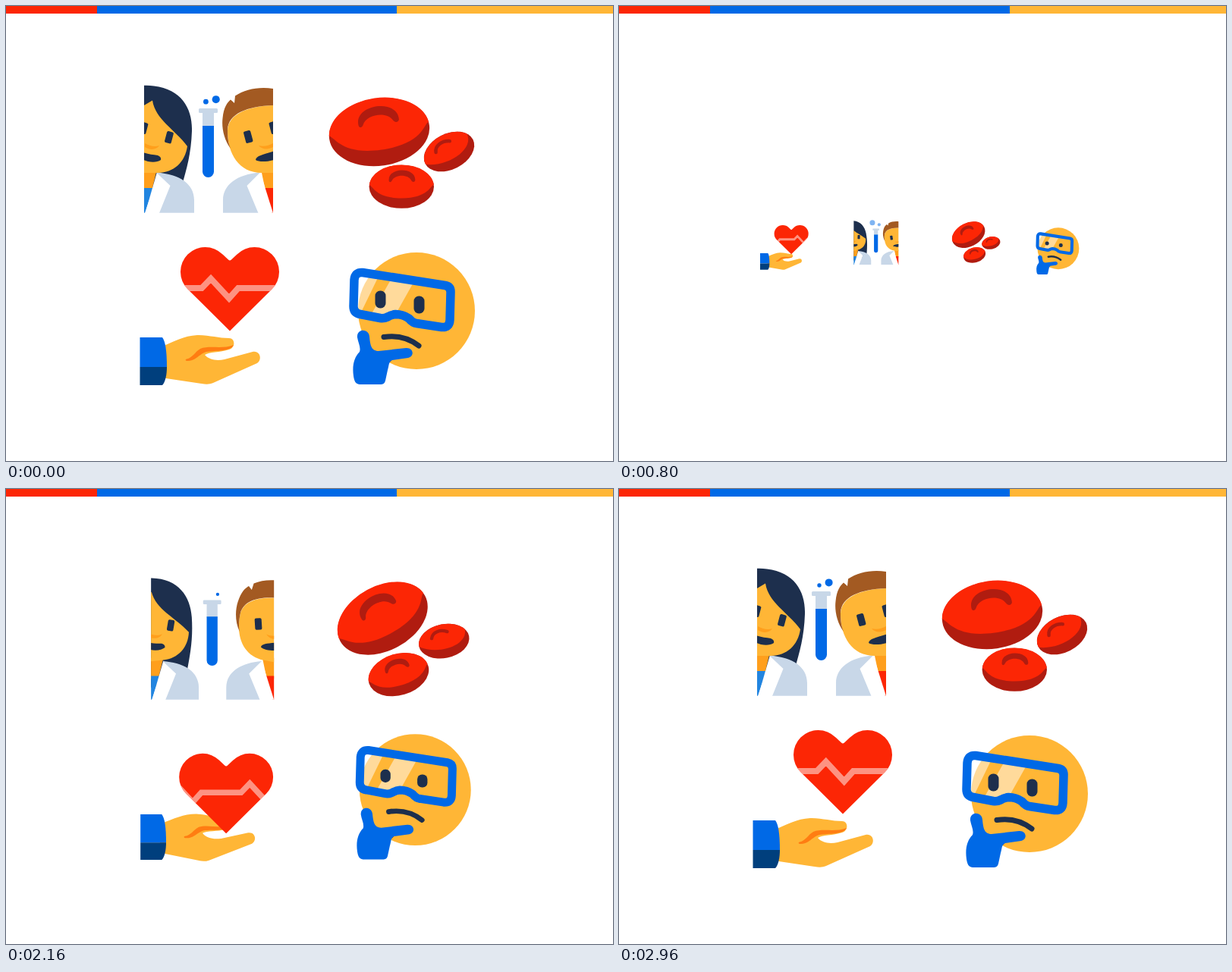
These frames come from a looping animation (800 by 600 pixels, 3000 ms). An HTML page:

```html
<!DOCTYPE html>
<html lang="en">
<head>
<meta charset="utf-8">
<title>Science icons</title>
<style>
  html, body { margin: 0; width: 100%; height: 100%; overflow: hidden; background: #fff; }
  svg { display: block; width: 800px; height: 600px; }
  .red { fill: #fc2605; }
  .maroon { fill: #b01c10; }
  .blue { fill: #0069e6; }
  .deep { fill: #003f7d; }
  .skin { fill: #ffb636; }
  .tan { fill: #ff9f1c; }
  .navy { fill: #1d2f4d; }
  .coat { fill: #c8d7e8; }
  .white { fill: #fff; }
</style>
</head>
<body>
<svg viewBox="0 0 800 600">
  <defs>
    <clipPath id="frame"><rect x="182" y="104" width="170" height="168.7"/></clipPath>
    <path id="heartShape" d="M295 428.5L239.5 373.5A32.5 32.5 0 0 1 285.5 327.5L293 334.5Q295 336.5 297 334.5L304.5 327.5A32.5 32.5 0 0 1 350.5 373.5Z"/>
    <clipPath id="heartClip"><use href="#heartShape"/></clipPath>
    <path id="lensShape" d="M470 351.5L579 368.5Q586.5 370 586 378L585 414Q584.5 424.5 574 423.5L541 418.5Q536 418 531 412Q523 406.5 513.5 406.5Q508 407 503 410Q498 412.5 493 411.5L467 406.5Q458 405 458 396L459 361Q460 350.5 470 351.5Z"/>
    <clipPath id="lensClip"><use href="#lensShape"/></clipPath>
    <g id="cell">
      <ellipse class="maroon" rx="66.5" ry="44.5"/>
      <path class="red" d="M-66.3 -4A66.5 44.5 0 0 1 66.3 -4C60 -4 56 23.5 0 23.5C-52 23.5 -58 0 -66.3 -4Z"/>
      <path class="maroon" d="M-26 -13C-28 -41 30 -41 28 -13C27 -9 22 -9 20 -13C14 -26 -14 -26 -20 -12C-22 -8 -26 -9 -26 -13Z"/>
    </g>
  </defs>

  <rect class="red" width="120" height="10"/>
  <rect class="blue" x="120" width="395" height="10"/>
  <rect class="skin" x="515" width="285" height="10"/>

  <g id="people">
    <g clip-path="url(#frame)">
      <path id="womanHair" class="navy" d="M140 160C140 110 170 102 195 105.500C232 110 246 136 245 165C244 195 238 215 232 236L224 256L140 256Z"/>
      <path class="tan" d="M170 215H199L192 244H170Z"/>
      <path d="M170 240H194L183 273H170Z" fill="#2285e0"/>
      <path class="white" d="M199 219L183.500 273H204L218 236Z"/>
      <path class="coat" d="M198 219.500C230 222 248 235 248 256V273H202L216.500 237Z"/>
      <g id="woman">
        <path class="skin" d="M150 146L182 131L193 124.500C197 150 222 162 239 185C236 206 221 220 200 220H180C165 220 150 205 150 180Z"/>
        <rect class="navy" x="210.500" y="165.500" width="9" height="15.500" rx="2" transform="rotate(15 215 173)"/>
        <rect class="navy" x="177" y="153.500" width="9" height="15" rx="2" transform="rotate(15 181.500 161)"/>
        <path class="tan" d="M183 181C190 185 197 186 202 184C199 189 191 191 183 186Z"/>
        <path class="navy" d="M172 189C182 195 191 196 200 197Q205 199 204 203Q198 207 187 205L172 200Z"/>
      </g>

      <path class="tan" d="M336 215H364V244H342Z"/>
      <path class="red" d="M340 240H364V273H350Z"/>
      <path class="white" d="M335 219L352 273H331L316 236Z"/>
      <path class="coat" d="M335 219.500C304 222 286 236 286 256V273H332.500L317.500 237Z"/>
      <g id="man">
        <path class="skin" d="M390 131H352C320 132 292 142 292 165C292 195 307 220 337 220H360C380 220 390 200 390 180Z"/>
        <path d="M296 188C287 176 284 160 285.500 148C287 133 292 127 296 123.500L301 128L302 118.500C315 110 333 106 352 109C375 111 392 122 392 140L352 131C318 132 293 142 292 163C292 174 293 181 296 188Z" fill="#a35a22"/>
        <rect class="navy" x="314.500" y="164.500" width="9.500" height="16" rx="2" transform="rotate(-15 319 172.500)"/>
        <rect class="navy" x="348" y="152.500" width="9.500" height="16" rx="2" transform="rotate(-15 352.500 160.500)"/>
        <path class="tan" d="M333 184C340 186 346 184 352 181V186C345 190 337 189 333 184Z"/>
        <path class="navy" d="M329 203C330 196 343 196 362 188V199C352 205 335 207 329 203Z"/>
      </g>

      <rect class="coat" x="254" y="135" width="25" height="6" rx="1.500"/>
      <path class="coat" d="M259 138H274V160H259Z"/>
      <path class="blue" d="M259 158H274V218.500A7.500 7.500 0 0 1 259 218.500Z"/>
    </g>
    <circle id="bubbleA" class="blue"/>
    <circle id="bubbleB" class="blue"/>
  </g>

  <g id="blood">
    <use id="cellBig" href="#cell"/>
    <g id="cellSmall">
      <ellipse class="maroon" rx="35.300" ry="23.500"/>
      <path class="red" d="M-35.200 1A35.300 23.500 0 0 1 31.500 -10.500C32 12 -10 18 -35.200 1Z"/>
      <path d="M-16 -7C-13 -16 -2 -17 7 -12" fill="none" stroke="#b01c10" stroke-width="4.500" stroke-linecap="round"/>
    </g>
    <use id="cellLow" href="#cell"/>
  </g>

  <g id="care">
    <g id="hand">
      <path class="skin" d="M204 450C222 442 234 435 252 434C268 434 280 438 294 438C302 438 303 450 294 453C282 457 268 456 262 460C268 467 278 468 288 466L325 456C335 454 338 466 331 471L273 497C268 499 264 499 258 498L204 490Z"/>
      <path d="M238 465.500C246 464 249 456 256 452C268 447 285 453 300 447C296 456 276 454 264 456C256 458 250 468 240 468C236 468 236 466 238 465.500Z" fill="#ff7d12"/>
    </g>
    <path class="blue" d="M176.500 437H206C210 442 212 455 212 476H176.500Z"/>
    <path class="deep" d="M176.500 476H212C212 486 210 496 206 500H176.500Z"/>
    <g id="heart">
      <use href="#heartShape" class="red"/>
      <g clip-path="url(#heartClip)">
        <path id="pulse" fill="none" stroke="#fff" stroke-opacity=".5" stroke-width="8"/>
      </g>
    </g>
  </g>

  <g id="thinker">
    <circle id="head" class="skin" cx="541" cy="402" r="77"/>
    <g id="goggles">
      <g clip-path="url(#lensClip)" fill="#fff" fill-opacity=".5">
        <path d="M450 340H499L465 410H450Z"/>
        <path d="M511 354H543L507 418H475Z"/>
      </g>
      <use href="#lensShape" fill="none" stroke="#0069e6" stroke-width="11.500" stroke-linejoin="round"/>
      <rect id="eyeL" class="navy" x="486.500" width="14" rx="6.500"/>
      <rect id="eyeR" class="navy" x="537.500" width="14" rx="6.500"/>
      <path d="M498 436.500C514 434 530 437 544 448" fill="none" stroke="#1d2f4d" stroke-width="7" stroke-linecap="round"/>
    </g>
    <g id="glove">
      <path class="navy" d="M492 466L509 466C505 473 497 473 492 466Z"/>
      <path class="blue" d="M463 437C462 425 478 425 479 436C480 446 481 455 491 455L527 451C537 450 539 462 530 464L509 467C504 469 505 474 503 480L500 494C499 498 497 499 493 499L466 499C460 498 459 494 458 488C456 474 459 463 466 456C468 450 464 444 463 437Z"/>
    </g>
  </g>
</svg>

<script>
const LOOP = 3000, STEP = 40, WAVE = 103;
const $ = id => document.getElementById(id);
const clamp = u => Math.min(1, Math.max(0, u));
const ease = u => (1 - Math.cos(Math.PI * clamp(u))) / 2;
const mix = (a, b, u) => a + (b - a) * u;
// Rises from a to b, holds, falls from c to d.
const swell = (t, a, b, c, d) => ease((t - a) / (b - a)) - ease((t - c) / (d - c));
const ramp = (t, keys) => {
  let [t0, v0] = keys[0];
  if (t <= t0) return v0;
  for (const [t1, v1] of keys) {
    if (t < t1) return mix(v0, v1, (t - t0) / (t1 - t0));
    t0 = t1; v0 = v1;
  }
  return v0;
};
const pose = (id, value) => $(id).setAttribute('transform', value);
const set = (id, attrs) => {
  for (const key in attrs) $(id).setAttribute(key, attrs[key]);
};

// Anchor in the grid, anchor in the row, row scale.
const icons = {
  people: [267, 188.5, 344, 321, .3],
  blood: [521, 238.4, 464.7, 335, .3],
  care: [176.5, 437, 186.7, 318, .3],
  thinker: [456, 499, 557, 343.7, .31]
};

function layout(t) {
  const p = swell(t, 600, 840, 1960, 2200);
  for (const id in icons) {
    const [ax, ay, bx, by, k] = icons[id];
    pose(id, `translate(${mix(ax, bx, p)} ${mix(ay, by, p)}) scale(${mix(1, k, p)}) translate(${-ax} ${-ay})`);
  }
}

function people(t) {
  const w = -15 * swell(t, 200, 1000, 1850, 2380);
  pose('woman', `rotate(${w} 180 231)`);
  pose('womanHair', `rotate(${w} 180 231)`);
  pose('man', `rotate(${15 * swell(t, 440, 1240, 1850, 2800)} 346 226)`);

  const b = (t + 1200) % LOOP;
  const opacity = clamp((2400 - b) / 800);
  set('bubbleA', {
    cx: ramp(b, [[700, 266], [1160, 264], [1840, 254], [2400, 250]]),
    cy: ramp(b, [[700, 131], [1160, 127], [1840, 113.5], [2400, 110]]),
    r: ramp(b, [[700, 0], [1160, 2.7], [1200, 3.4], [1840, 10], [2400, 10.5]]),
    opacity
  });
  set('bubbleB', {
    cx: ramp(b, [[0, 272], [520, 275], [1160, 276.6], [1840, 278.5]]),
    cy: ramp(b, [[0, 130], [520, 126], [1160, 123.4], [1840, 120]]),
    r: ramp(b, [[0, 0], [200, 1.6], [520, 2.9], [1160, 5], [1840, 6]]),
    opacity
  });
}

function blood(c) {
  pose('cellBig', `translate(${498 - 6 * c} ${161.5 + 4.7 * c}) rotate(${-25 + 17 * c})`);
  pose('cellLow', `translate(521.3 238.3) rotate(${-14 + 14 * c}) scale(.642)`);
  pose('cellSmall', `translate(584 192) rotate(${-14 - 13 * c})`);
}

function care(t) {
  const drop = swell(t, 440, 1600, 1800, 2640);
  pose('heart', `translate(0 ${57 * drop})`);
  pose('hand', `rotate(${5 * drop} 205 468)`);
  const start = 270 - 2 * WAVE * t / LOOP - WAVE;
  let d = `M${start - 60} 372`;
  for (let i = 0; i < 5; i++) {
    const x = start + i * WAVE;
    d += `L${x - 12} 372L${x} 359.5L${x + 24} 385.5L${x + 36} 372`;
  }
  set('pulse', { d });
}

function thinker(t, c) {
  const g = 1 - c;
  pose('head', `translate(${-4 * g} ${.5 * g})`);
  pose('goggles', `translate(${1.4 * g} ${-3 * g})`);
  pose('glove', `translate(${-1.5 * g} 0)`);
  const height = 23 - 9 * swell(t, 100, 640, 1700, 2700);
  set('eyeL', { y: 387 - height / 2, height });
  set('eyeR', { y: 394 - height / 2, height });
}

function draw(now) {
  const t = Math.floor(now % LOOP / STEP) * STEP;
  const c = Math.cos(2 * Math.PI * t / LOOP);
  layout(t);
  people(t);
  blood(c);
  care(t);
  thinker(t, c);
}

const begin = performance.now();
function tick() {
  draw(performance.now() - begin);
  requestAnimationFrame(tick);
}
tick();
</script>
</body>
</html>
```
